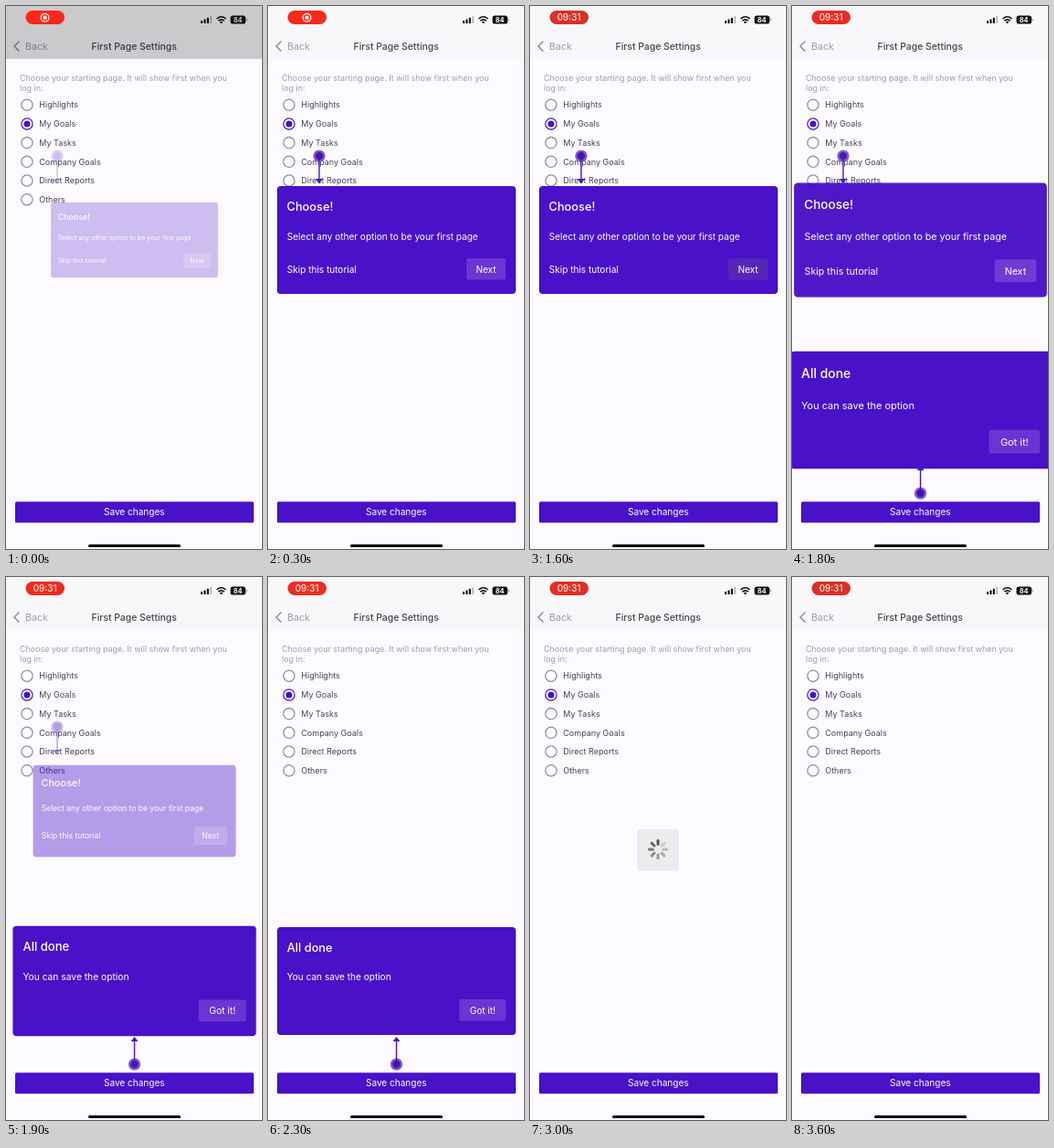
Recreate the animation shown at these times as an HTML page. Size 280x594 px, loop 3700 ms.

```html
<!DOCTYPE html>
<html lang="en">
<head>
<meta charset="utf-8">
<title>First Page Settings</title>
<style>
  html, body { margin: 0; height: 100%; overflow: hidden; background: #fdfbff; }
  svg { display: block; width: 280px; height: 594px; font: 10.05px Inter, "Open Sans", sans-serif; }
  .mid { text-anchor: middle; }
  .popup { fill: #fff; }
  .popup .card { fill: #4911c8; }
  .popup .title { font-size: 12.8px; font-weight: 500; }
  .list { font-size: 9px; fill: #454553; }
</style>
</head>
<body>
<svg viewBox="0 0 280 594">
  <rect width="280" height="594" fill="#fdfbff"/>
  <rect width="280" height="58" fill="#f8f8fb"/>

  <rect x="213" y="16" width="2" height="3" rx=".6"/>
  <rect x="216.4" y="14.5" width="2" height="4.5" rx=".6"/>
  <rect x="219.8" y="12.8" width="2" height="6.2" rx=".6"/>
  <rect x="223.2" y="11" width="2" height="8" rx=".6" fill="#bbb"/>
  <g fill="none" stroke="#111" stroke-width="1.6">
    <path d="M230.5 14Q235.500 9.500 240.500 14M232.300 16.200Q235.500 13.400 238.700 16.200"/>
  </g>
  <path d="M233.700 17.500Q235.500 16 237.300 17.500L235.500 19.300Z"/>
  <rect x="245.500" y="10.500" width="16.500" height="9" rx="2.600" fill="#111"/>
  <rect x="262.600" y="13.500" width="1" height="3" rx=".5" fill="#777"/>
  <text class="mid" x="253.700" y="17.700" fill="#fff" font-size="7.300" font-weight="700">84</text>

  <path d="M14.500 38.500L9 44L14.500 49.500" fill="none" stroke="#85889c" stroke-width="1.400"/>
  <text x="21" y="47.800" font-size="10.700" fill="#999caf">Back</text>
  <text class="mid" x="140.200" y="47.800" font-size="10.400" font-weight="500" fill="#44444f">First Page Settings</text>
  <rect id="dim" width="280" height="58"/>

  <rect id="pill" x="21.500" y="5" width="42.500" height="15" rx="7.500"/>
  <g id="rec">
    <circle cx="42.500" cy="12.700" r="4.400" fill="none" stroke="#fff" stroke-width="1.200"/>
    <circle cx="42.500" cy="12.700" r="2.200" fill="#fff"/>
  </g>
  <text id="clock" class="mid" x="42.700" y="16.400" fill="#ffe9e5" font-size="9.900" font-weight="500">09:31</text>

  <g font-size="8.950" fill="#9b9eae">
    <text x="15" y="82">Choose your starting page. It will show first when you</text>
    <text x="15" y="92.800">log in:</text>
  </g>
  <g id="list" class="list"></g>

  <rect x="10" y="542.300" width="261" height="23" rx="1.500" fill="#4911c8"/>
  <text class="mid" x="140.300" y="557.400" fill="#fff">Save changes</text>
  <rect x="90" y="589" width="101" height="3" rx="1.500"/>

  <g id="loader">
    <rect x="117" y="276" width="46" height="45.500" rx="4" fill="#ececef"/>
    <g id="spokes" stroke="#333" stroke-width="3" stroke-linecap="round"></g>
  </g>

  <g id="arrow0" fill="#4911c8">
    <circle cx="56" cy="164" r="6.600" fill="#7b58d3"/>
    <circle cx="56" cy="164" r="4.200" fill="#4614ac"/>
    <path d="M55.300 168h1.400v21h3.300L56 194L52 189h3.300z"/>
  </g>
  <g id="arrow1" fill="#4911c8">
    <circle cx="140.500" cy="533" r="6.600" fill="#7b58d3"/>
    <circle cx="140.500" cy="533" r="4.200" fill="#4614ac"/>
    <path d="M139.800 529h1.400v-21h3.300L140.500 503L136.500 508h3.300z"/>
  </g>

  <g id="popup0" class="popup">
    <rect class="card" x="10" y="197" width="261" height="118" rx="4"/>
    <text class="title" x="20.500" y="224.300">Choose!</text>
    <text x="20.800" y="255.700">Select any other option to be your first page</text>
    <text x="20.800" y="291.500">Skip this tutorial</text>
    <rect id="next" x="217" y="276" width="43" height="23.500" rx="2"/>
    <text class="mid" x="238.500" y="291.500">Next</text>
  </g>
  <g id="popup1" class="popup">
    <rect class="card" x="10" y="383" width="261" height="118" rx="4"/>
    <text class="title" x="20.800" y="410">All done</text>
    <text x="20.800" y="441.300">You can save the option</text>
    <rect id="got" x="209.300" y="462" width="51" height="23.500" rx="2"/>
    <text class="mid" x="234.800" y="477.500">Got it!</text>
  </g>
</svg>
<script>
const LOOP = 3700, STEP = 100;
const el = id => document.getElementById(id);
const set = (id, name, value) => el(id).setAttribute(name, value);
const fade = (id, value) => set(id, 'opacity', value);

// Linear interpolation through alternating time, value pairs
function track(t, ...keys) {
  if (t <= keys[0]) return keys[1];
  for (let i = 2; i < keys.length; i += 2) {
    if (t <= keys[i]) {
      const p = (t - keys[i - 2]) / (keys[i] - keys[i - 2]);
      return keys[i - 1] + p * (keys[i + 1] - keys[i - 1]);
    }
  }
  return keys[keys.length - 1];
}

const options = ['Highlights', 'My Goals', 'My Tasks', 'Company Goals', 'Direct Reports', 'Others'];
el('list').innerHTML = options.map((label, i) => {
  const y = 108.2 + i * 20.7, on = i === 1;
  return `<circle cx="23" cy="${y}" r="6.1" fill="#fff" stroke="${on ? '#5424b8' : '#8d90a7'}" stroke-width="1.3"/>` +
    (on ? `<circle cx="23" cy="${y}" r="3.5" fill="#4911c8"/>` : '') +
    `<text x="36.3" y="${y + 3.2}">${label}</text>`;
}).join('');

el('spokes').innerHTML = Array.from({ length: 8 }, (_, i) =>
  `<path d="M140 292.300v-4" transform="rotate(${i * 45} 140 298)"/>`).join('');
const spokes = [...el('spokes').children];

function popup(i, y, scale, alpha) {
  set('popup' + i, 'transform', `translate(140.5 ${y}) scale(${scale}) translate(-140.5 ${-y})`);
  fade('popup' + i, alpha);
  fade('arrow' + i, alpha);
}

const buttonFill = pressed => pressed ? '#5627b7' : '#6a35d2';

function draw(t) {
  popup(0, 256,
    track(t, 0, .7, 100, 1.09, 200, 1.02, 300, 1, 1600, 1, 1800, 1.06, 1900, .85, 2000, .5),
    track(t, 0, .26, 100, 1, 1700, 1, 1800, .97, 1900, .4, 2000, 0));
  popup(1, 441.8,
    track(t, 1600, .4, 1700, .7, 1800, 1.09, 1900, 1.02, 2000, 1, 2600, 1, 2800, 1.1, 2900, .85, 3000, .5),
    track(t, 1600, 0, 1700, .26, 1800, 1, 2800, 1, 2900, .4, 3000, 0));
  set('next', 'fill', buttonFill(t >= 1500 && t < 1700));
  set('got', 'fill', buttonFill(t >= 2500 && t < 2700));

  fade('dim', track(t, 0, .19, 200, 0));
  fade('rec', track(t, 900, 1, 1100, 0));
  fade('clock', track(t, 900, 0, 1100, 1));
  const dark = track(t, 0, 0, 300, .1, 900, 1, 1300, .3, 1600, .95, 1800, .45, 2300, .45, 2800, 1, 3200, .5, 3600, .9);
  set('pill', 'fill', `rgb(${255 - 39 * dark},${40 + 8 * dark},${24 + 18 * dark})`);

  fade('loader', track(t, 2600, 0, 2700, 1, 3200, 1, 3400, 0));
  const head = (Math.floor(t / STEP) + 2) % 8;
  spokes.forEach((spoke, i) =>
    spoke.setAttribute('opacity', .8 - .09 * ((head - i + 8) % 8)));
}

function frame() {
  const t = performance.now() % LOOP;
  draw(Math.floor(t / STEP) * STEP);
  requestAnimationFrame(frame);
}
frame();
</script>
</body>
</html>
```
